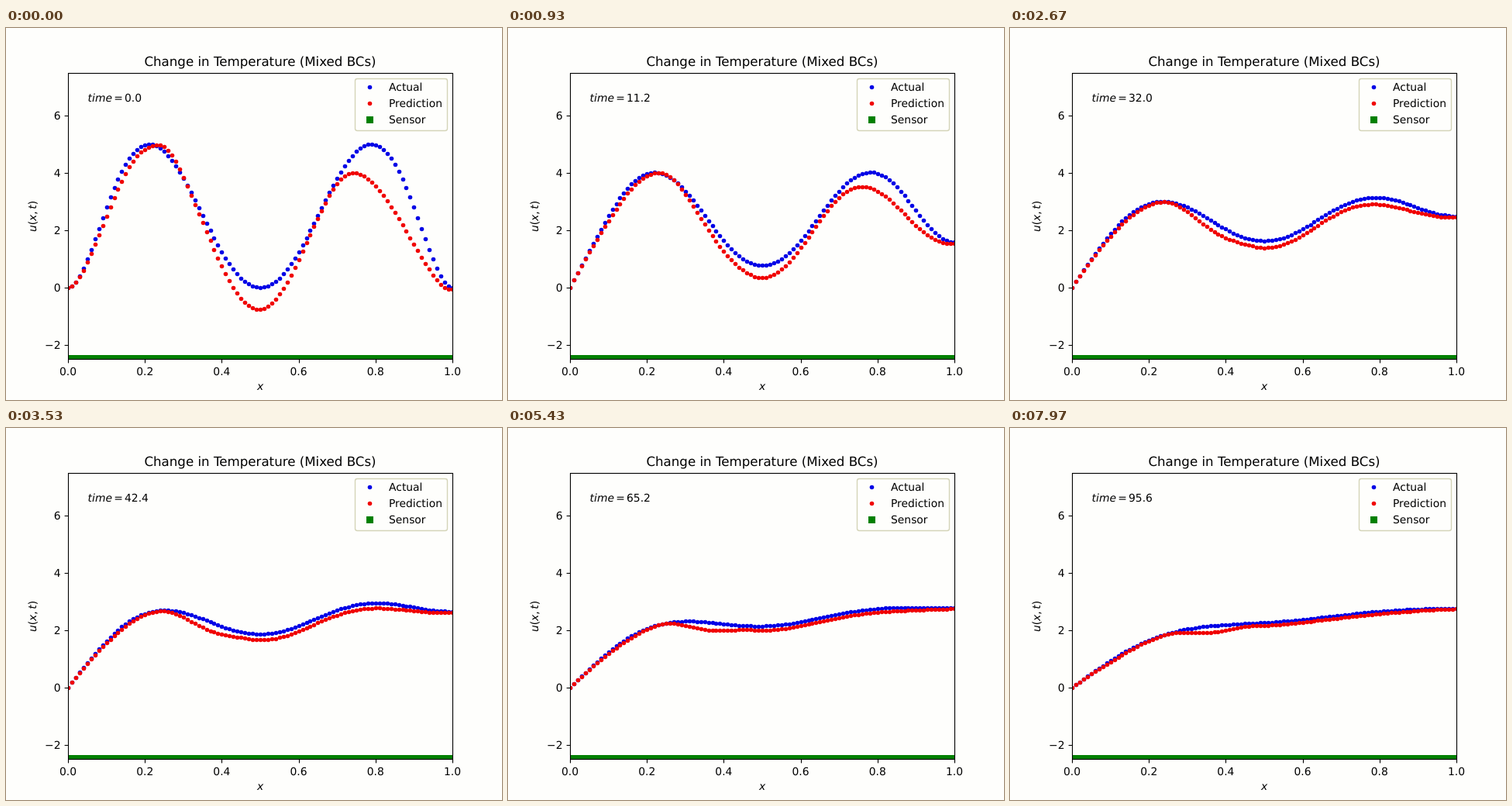
Write an HTML page with a canvas that moves like this. It is 640 px wide and 480 px high and loops after 8 s.

```html
<!DOCTYPE html>
<html lang="en">
<head>
<meta charset="utf-8">
<title>Change in Temperature</title>
<style>
  html, body { margin: 0; width: 100%; height: 100%; overflow: hidden; background: #fefefc; }
  canvas, svg { position: absolute; left: 0; top: 0; width: 640px; height: 480px; }
  text { font: 13.89px "DejaVu Sans", sans-serif; fill: #000; text-rendering: geometricPrecision; }
  .title { font-size: 16.67px; }
  .mid { text-anchor: middle; }
  .end { text-anchor: end; }
  .var { font-style: oblique; }
  .line { fill: none; stroke: #000; stroke-width: 1.11; }
</style>
</head>
<body>
<canvas id="plot" width="640" height="480"></canvas>
<svg id="axes" viewBox="0 0 640 480">
  <rect class="line" x="80.5" y="58.5" width="496" height="369"/>
  <text class="title mid" x="328" y="49">Change in Temperature (Mixed BCs)</text>
  <text class="var mid" x="328" y="467">x</text>
  <text class="mid" transform="translate(38.5 243) rotate(-90)"><tspan class="var">u</tspan>(<tspan class="var">x</tspan>,<tspan class="var" dx="2.5">t</tspan>)</text>
  <text class="var" x="105.6" y="95">time</text>
  <text x="139.3" y="95">=</text>
  <text id="clock" x="153" y="95">0.0</text>
  <rect x="450.5" y="65.5" width="119" height="67" rx="2.8" fill="#fefefc" stroke="#d4d4b8" stroke-width="1.39"/>
  <circle cx="469.5" cy="76.5" r="2.78" fill="#0000e6"/>
  <circle cx="469.5" cy="97.5" r="2.78" fill="#f00000"/>
  <rect x="465" y="114" width="9" height="9" fill="#008000"/>
  <text x="494" y="81">Actual</text>
  <text x="494" y="102">Prediction</text>
  <text x="494" y="123">Sensor</text>
</svg>
<script>
const LOOP = 8000, FRAMES = 240, POINTS = 100, TIME_STEP = 0.4;
const DIFFUSIVITY = 0.0003, SUBSTEPS = 4;
const px = x => 80 + 496 * x;
const py = u => 334.8 - 36.96 * u;

// Prediction error: smooth bumps, each with a quickly and a slowly fading part.
const FAST_LIFE = 10;
const bumps = [
  { at: 0.13, reach: 0.13, fast: -0.2, slow: -0.15, life: 80 },
  { at: 0.27, reach: 0.07, fast: 0.22, slow: 0, life: 80 },
  { at: 0.355, reach: 0.12, fast: 0.13, slow: -0.28, life: 250 },
  { at: 0.485, reach: 0.17, fast: -0.6, slow: -0.1, life: 80 },
  { at: 0.65, reach: 0.48, fast: 0.2, slow: -0.3, life: 80 },
  { at: 0.845, reach: 0.17, fast: -1.57, slow: -0.06, life: 80 }
];

function bumpShape(distance, reach) {
  return distance < reach ? (1 + Math.cos(Math.PI * distance / reach)) / 2 : 0;
}

function errorAt(x, t) {
  return bumps.reduce((sum, b) => {
    const height = b.fast * Math.exp(-t / FAST_LIFE) + b.slow * Math.exp(-t / b.life);
    return sum + height * bumpShape(Math.abs(x - b.at), b.reach);
  }, 0);
}

// Heat equation: fixed left end, insulated right end.
function diffuse(u) {
  const r = DIFFUSIVITY * (TIME_STEP / SUBSTEPS) * POINTS * POINTS;
  return u.map((v, i) => {
    if (i === 0) return 0;
    const right = i === POINTS ? u[i - 1] : u[i + 1];
    return v + r * (u[i - 1] - 2 * v + right);
  });
}

const states = [Array.from({ length: POINTS + 1 }, (_, i) => {
  const x = i / POINTS;
  return 540 * (x * (1 - x) * (1 - 2 * x)) ** 2;
})];
while (states.length < FRAMES) {
  let u = states[states.length - 1];
  for (let s = 0; s < SUBSTEPS; s++) u = diffuse(u);
  states.push(u);
}

function addAxes() {
  const svg = document.getElementById("axes");
  const add = (tag, attrs, text = "") => {
    const node = document.createElementNS(svg.namespaceURI, tag);
    for (const name in attrs) node.setAttribute(name, attrs[name]);
    node.textContent = text;
    svg.append(node);
  };
  for (let k = 0; k <= 5; k++) {
    const x = px(k / 5);
    add("path", { class: "line", d: `M${Math.round(x) + 0.5} 428v4.4` });
    add("text", { class: "mid", x, y: 448 }, (k / 5).toFixed(1));
  }
  for (let v = -2; v <= 6; v += 2) {
    const y = Math.round(py(v));
    add("path", { class: "line", d: `M80 ${y + 0.5}h-4.4` });
    add("text", { class: "end", x: 70.5, y: y + 5 }, String(v).replace("-", "\u2212"));
  }
}

const ctx = document.getElementById("plot").getContext("2d");
const clock = document.getElementById("clock");
ctx.beginPath();
ctx.rect(80, 57, 497, 371);
ctx.clip();

function dots(values, color) {
  ctx.fillStyle = color;
  values.forEach((u, i) => {
    ctx.beginPath();
    ctx.arc(Math.round(px(i / POINTS)) + 0.5, Math.round(py(u)) + 0.5, 2.78, 0, 2 * Math.PI);
    ctx.fill();
  });
}

let shown = -1;
function draw(now) {
  const ms = Math.floor((now % LOOP) / 10) * 10;
  const step = Math.min(FRAMES - 1, Math.floor((ms + 3.4) * FRAMES / LOOP));
  if (step !== shown) {
    shown = step;
    const t = step * TIME_STEP, actual = states[step];
    ctx.clearRect(0, 0, 640, 480);
    dots(actual, "#0000e6");
    dots(actual.map((u, i) => u + errorAt(i / POINTS, t)), "#f00000");
    ctx.fillStyle = "#008000";
    ctx.fillRect(80, 422, 497, 6);
    clock.textContent = t.toFixed(1);
  }
  requestAnimationFrame(draw);
}

addAxes();
draw(0);
</script>
</body>
</html>
```
